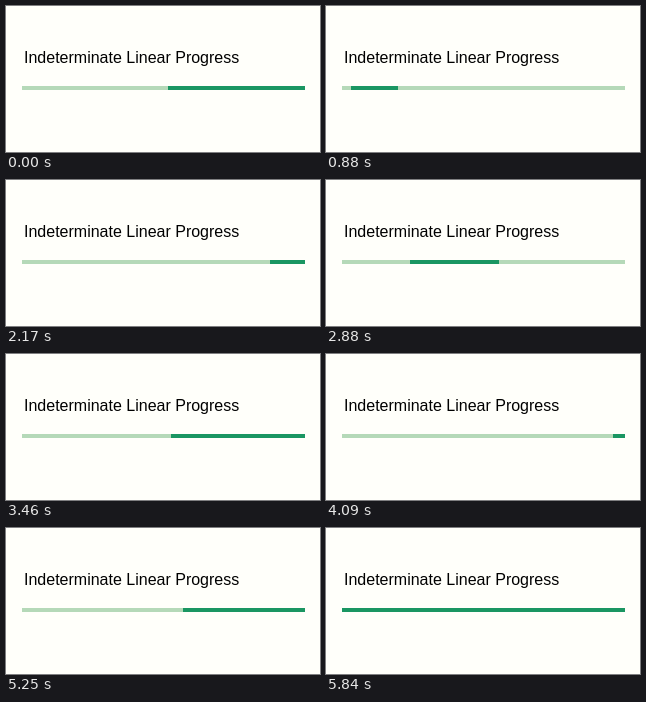
Recreate the animation shown at these times as an HTML page. Size 314 by 146 pixels, loop 5.89 s.

```html
<!DOCTYPE html>
<html lang="en">
<head>
<meta charset="utf-8">
<title>Indeterminate Linear Progress</title>
<style>
  html, body { margin: 0; width: 100%; height: 100%; overflow: hidden; background: #fffffa; }
  p {
    position: absolute; left: 18px; top: 42px; margin: 0;
    font: 16px/19px "Liberation Sans", Arial, sans-serif;
    color: #000; white-space: nowrap;
  }
  #track {
    position: absolute; left: 16px; top: 80px; width: 283px; height: 4px;
    overflow: hidden; background: #b5d9b8;
  }
  #bar { position: absolute; top: 0; height: 100%; background: #1a9662; }
</style>
</head>
<body>
<p>Indeterminate Linear Progress</p>
<div id="track"><div id="bar"></div></div>
<script>
const LOOP = 5890, FULL_AT = 5840, CYCLE = 1713, START = 0.5625;
const bar = document.getElementById('bar');

// Cubic easing with control points (x1, 0) and (x2, 1), solved by bisection.
function ease(x, x1, x2) {
  let lo = 0, hi = 1, s = 0.5;
  for (let i = 0; i < 24; i++) {
    s = (lo + hi) / 2;
    const r = 1 - s;
    if (3 * r * r * s * x1 + 3 * r * s * s * x2 + s ** 3 < x) lo = s;
    else hi = s;
  }
  return s * s * (3 - 2 * s);
}

// Tail and head of the bar as fractions of the track.
function span(t) {
  if (t >= FULL_AT) return [0, 1];
  const phase = (START + t / CYCLE) % 1;
  if (phase < 0.5) {
    const e = ease(phase * 2, 0.42, 0.6);
    return [0.01 + 0.49 * e, 0.16 + 0.84 * e];
  }
  return [0.5 + 0.465 * ease(phase * 2 - 1, 0.42, 0.5), 1];
}

const begin = performance.now();
function draw() {
  const [tail, head] = span((performance.now() - begin) % LOOP);
  bar.style.left = tail * 100 + '%';
  bar.style.width = (head - tail) * 100 + '%';
  requestAnimationFrame(draw);
}
draw();
</script>
</body>
</html>
```
